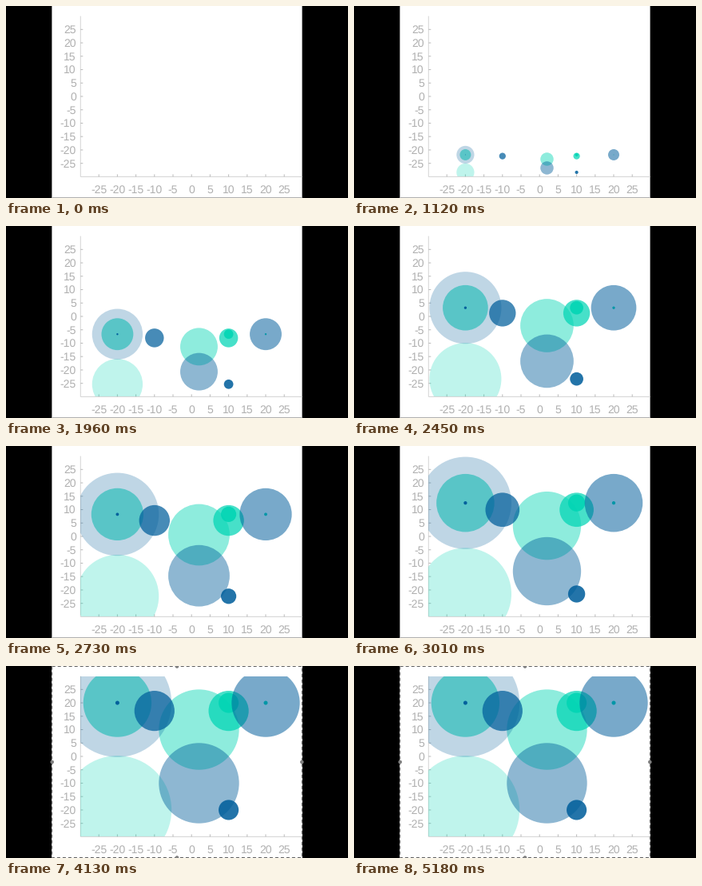
Write a matplotlib script that moves like this. It is 428 px wide and 240 px high and loops after 5250 ms.

```python
import matplotlib.pyplot as plt
import numpy as np
from matplotlib.animation import FuncAnimation
from matplotlib.patches import Circle, Rectangle

plt.rcParams.update({"path.snap": False, "text.hinting": "none"})

W, H, DPI = 428, 240, 100
STEP, FRAMES = 70, 75
RISE_START, RISE_TIME = -60, 4200
FIRST_VISIBLE, SELECTED_AT = 280, 3640

PAGE_LEFT, PAGE_RIGHT = 57.4, 370.6
LEFT, TOP, BOTTOM = 93.3, 12.6, 213.4
TEAL, BLUE = (0, 213 / 255, 180 / 255), (0, 94 / 255, 155 / 255)

# each teal bubble has a blue twin, mirrored across the given axis
TEAL_BUBBLES = [(-20, 20, 17, "y"), (-20, -20, 27, "x"), (2, 10, 20, "x"),
                (10, 17, 10, "y"), (10, 20, 5, "x"), (20, 20, 1, "y")]


def mirrored(x, y, size, axis):
    return (x, -y, size) if axis == "x" else (-x, y, size)


def px(x):
    return 232.2 + 4.64 * x


def py(y):
    return 113 - 3.347 * y


def ease_in_out(u):
    """Cubic Bezier timing curve (0.42, 0, 0.58, 1)."""
    s = np.linspace(0, 1, 1001)
    xs = 3 * (1 - s) ** 2 * s * 0.42 + 3 * (1 - s) * s ** 2 * 0.58 + s ** 3
    return np.interp(u, xs, 3 * s ** 2 - 2 * s ** 3)


fig = plt.figure(figsize=(W / DPI, H / DPI), dpi=DPI, facecolor="black")
ax = fig.add_axes([0, 0, 1, 1])
ax.set_xlim(0, W)
ax.set_ylim(H, 0)
ax.axis("off")


def line(xs, ys, color="#d4d4d4", **style):
    return ax.plot(xs, ys, color=color, lw=72 / DPI, solid_capstyle="butt", **style)[0]


def label(x, y, value, align):
    ax.text(x, y, str(value), ha=align, va="center_baseline", color="#b0b0b0",
            family="Liberation Sans", size=14 * 72 / DPI)


ax.add_patch(Rectangle((PAGE_LEFT, 0), PAGE_RIGHT - PAGE_LEFT, H, fc="white", lw=0))
line([PAGE_LEFT, PAGE_RIGHT], [H - 0.5, H - 0.5], "#b0b0b0")

line([LEFT, LEFT], [TOP, BOTTOM])
line([LEFT, PAGE_RIGHT], [BOTTOM, BOTTOM])
for value in range(-25, 30, 5):
    x, y = px(value), py(value)
    line([LEFT, LEFT + 3], [y, y], "#bbbbbb")
    line([x, x], [BOTTOM - 3, BOTTOM], "#bbbbbb")
    label(87.8, y - 0.3, value, "right")
    label(x, 229, value, "center")

plot_area = Rectangle((LEFT, TOP), PAGE_RIGHT - LEFT, BOTTOM - TOP, transform=ax.transData)
bubbles = []


def add_bubble(color, x, y, size):
    # larger bubbles are fainter
    disc = Circle((px(x), BOTTOM), 0, fc=color, alpha=1 - size / 36, lw=0, zorder=3)
    ax.add_patch(disc)
    disc.set_clip_path(plot_area)
    bubbles.append((disc, px(x), py(y), 2.51 * size))


for x, y, size, _ in TEAL_BUBBLES:
    add_bubble(TEAL, x, y, size)
for bubble in TEAL_BUBBLES:
    add_bubble(BLUE, *mirrored(*bubble))

# selection frame with handles at the middle of each side
x0, x1, y0, y1 = PAGE_LEFT + 0.3, PAGE_RIGHT - 0.3, 0.5, H - 0.5
outline = ([x0, x1, x1, x0, x0], [y0, y0, y1, y1, y0])
selection = [line(*outline, "white", zorder=5),
             line(*outline, "#606060", zorder=5, dashes=(4, 3), dash_capstyle="butt")]
xm, ym = (x0 + x1) / 2, (y0 + y1) / 2
for center in [(xm, y0), (x0, ym), (x1, ym), (xm, y1)]:
    selection.append(ax.add_patch(Circle(center, 2.3, fc="#808080", lw=0, zorder=6)))


def update(frame):
    t = frame * STEP
    u = np.clip((t - RISE_START) / RISE_TIME, 0, 1)
    p = ease_in_out(u) if t >= FIRST_VISIBLE else 0
    for disc, x, y, radius in bubbles:
        disc.center = (x, BOTTOM + (y - BOTTOM) * p)
        disc.set_radius(radius * p)
        disc.set_visible(p > 0)
    for part in selection:
        part.set_visible(t >= SELECTED_AT)
    return [disc for disc, *_ in bubbles] + selection


anim = FuncAnimation(fig, update, frames=FRAMES, interval=STEP, repeat=True, repeat_delay=0)
plt.show()
```
